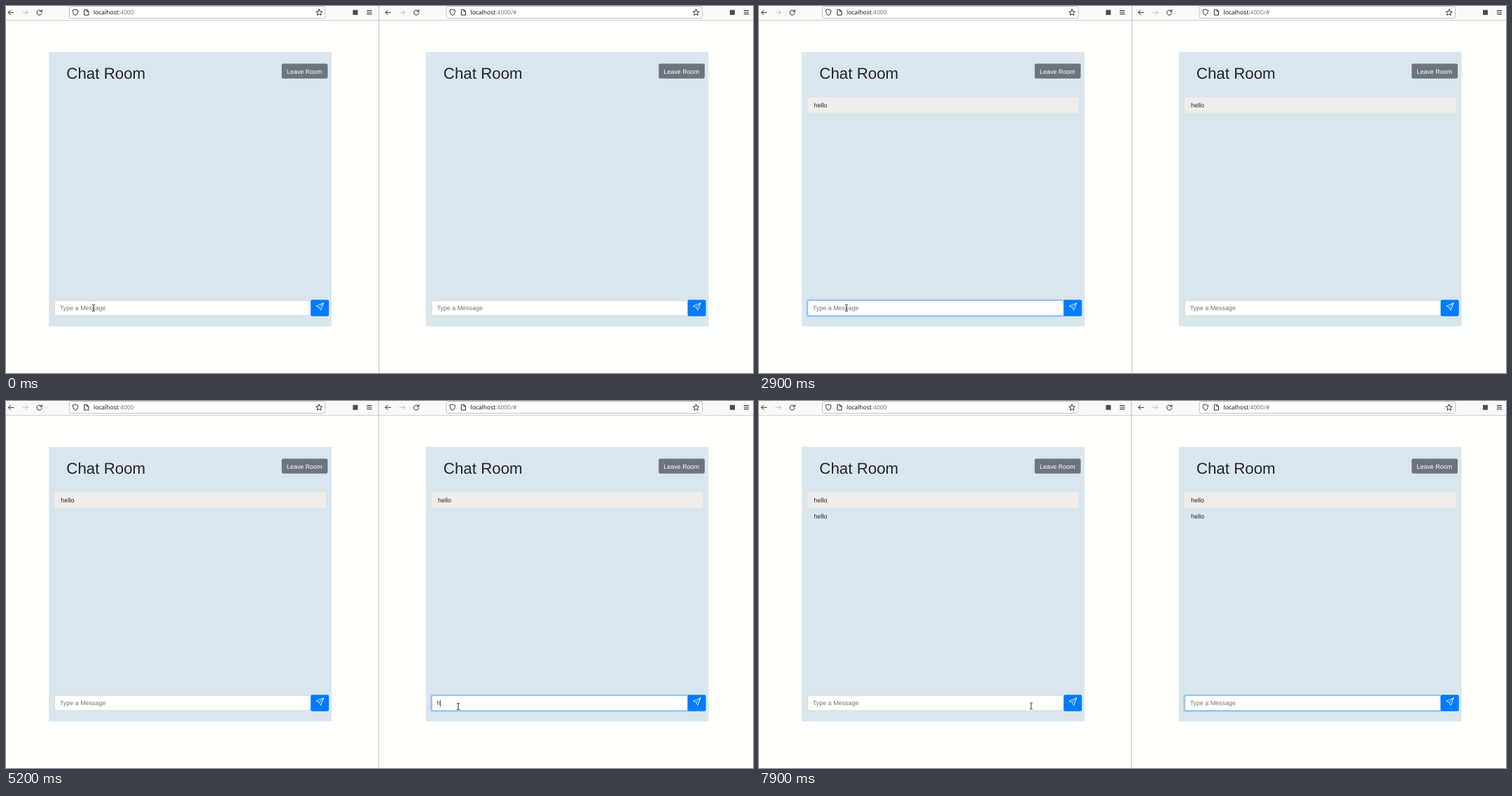
Recreate the animation shown at these times as an HTML page. Size 1067 by 525 pixels, loop 8 s.

```html
<!DOCTYPE html>
<html lang="en">
<head>
<meta charset="utf-8">
<title>Chat Room</title>
<style>
  html, body { margin: 0; width: 100%; height: 100%; overflow: hidden; background: #fffffc; }
  svg { display: block; }
  text { font: 8.93px "Liberation Sans", Arial, sans-serif; fill: #212529; text-rendering: geometricPrecision; }
  .title { font-size: 22.33px; }
  .url { font: 8.48px "Noto Sans", "Open Sans", sans-serif; fill: #15141a; }
  .port { fill: #77767b; }
  .hint { fill: #6c757d; }
  .typed { fill: #495057; }
  .light { fill: #fff; }
  .icon { fill: none; stroke: #2b2a33; stroke-width: 1; stroke-linecap: round; stroke-linejoin: round; }
  .off { stroke: #bdbdc0; }
</style>
</head>
<body>
<svg width="1067" height="525" viewBox="0 0 1067 525">
  <defs>
    <g id="toolbar">
      <rect x="90.5" y=".5" width="365.5" height="17" rx="2.5" fill="#fffffd" stroke="#bcbcbe" stroke-width=".9"/>
      <g class="icon">
        <path d="M11 9.3H3.5M6.7 6L3.4 9.3L6.7 12.6"/>
        <path class="off" d="M23.7 9.3H31.2M28 6L31.3 9.3L28 12.6"/>
        <path d="M50.6 7.4A3.6 3.6 0 1 0 51.2 10M51.3 5.4V8H48.6"/>
        <path d="M99.2 5L102.9 6.3C103 9.8 101.7 12.2 99.2 13.4C96.700 12.2 95.400 9.8 95.500 6.300Z"/>
        <path d="M112.200 5.300H115.700L118 7.600V13H112.200ZM115.500 5.500V7.800H117.800"/>
        <path d="M447.200 4.800L448.500 7.700L451.600 8L449.300 10.100L450 13.200L447.200 11.600L444.400 13.200L445.100 10.100L442.800 8L445.900 7.700Z"/>
        <path d="M515.800 6.500H522.200M515.800 9H522.200M515.800 11.500H522.200"/>
      </g>
      <rect x="495.500" y="5.700" width="7" height="7" fill="#4a4a52"/>
    </g>
    <g id="room">
      <rect x="61.200" y="65.700" width="403.800" height="392.500" fill="#d9e6ed"/>
      <text class="title" x="86.300" y="104">Chat Room</text>
      <rect x="393.800" y="82.400" width="65.700" height="21.400" rx="2.200" fill="#6c757d"/>
      <text class="light" x="401" y="96.500">Leave Room</text>
    </g>
    <g id="send">
      <rect x="435.200" y="420.200" width="26" height="23.500" rx="2.200" fill="#007bff"/>
      <path d="M453.800 424.700L443.200 429.200L447.300 431.300L449.600 435.200ZM447.300 431.300L453.800 424.700" fill="none" stroke="#fff" stroke-width=".85" stroke-linejoin="round"/>
    </g>
    <g id="beam" fill="none" stroke="#333" stroke-width="1">
      <path d="M0 -4V4M-2 -4.500H-.6L0 -4L.6 -4.500H2M-2 4.500H-.6L0 4L.6 4.500H2"/>
    </g>
    <path id="arrow" d="M0 0V9.500L2.200 7.500L3.600 10.800L5 10.200L3.600 7H6.600Z" fill="#222" stroke="#fff" stroke-width=".6"/>
    <path id="hand" d="M-.6 -4.500V1L-2 .2V1.500L-.8 5H2.600L3.300 .5L.8 -.2V-4.500Z" fill="#222" stroke="#fff" stroke-width=".5"/>
  </defs>

  <rect width="1067" height="525" fill="#fffffc"/>
  <rect width="1067" height="20" fill="#f9f9f8"/>
  <rect y="20" width="1067" height="1" fill="#d0d0d0"/>
  <g id="panes"></g>
  <rect id="divider" y="0" width="1" height="525" fill="#bdbdbd"/>
  <use id="cursor"/>
</svg>
<script>
const LOOP = 8000, TICK = 100, SHIFT = 538.5;

// Tracks hold [start time, ...value]; the latest started entry applies.
const panes = [
  {
    url: '',
    text: [[0, ''], [1400, 'h'], [1600, 'he'], [2100, 'hel'], [2200, 'hell'], [2400, 'hello'], [2900, '']],
    focus: [[0, 0], [600, .3], [700, .9], [800, 1], [4600, .4], [4700, 0]],
    caret: [[0, 0], [700, 1], [2900, 0], [3800, 1], [4300, 0]]
  },
  {
    url: '/#',
    text: [[0, ''], [5200, 'h'], [5300, 'he'], [5900, 'hel'], [6200, 'hello'], [6900, '']],
    focus: [[0, 0], [4600, .3], [4700, 1]],
    caret: [[0, 0], [4600, 1], [5700, 0], [5900, 1], [7000, 0]]
  }
];
const messages = [[0, 0], [2900, 1], [6900, 2]];
const pointer = [
  [0, 'beam', 125, 432],
  [3800, 'beam', 150, 434], [3900, 'beam', 240, 439], [4000, 'arrow', 350, 451],
  [4100, 'arrow', 470, 457], [4200, 'arrow', 560, 455], [4300, 'arrow', 624, 447],
  [4400, 'beam', 646, 437],
  [7500, 'beam', 650, 440], [7600, 'arrow', 560, 437], [7700, 'hand', 455, 435],
  [7900, 'beam', 388.7, 436.3]
];

const $ = id => document.getElementById(id);
const at = (track, t) => track.findLast(entry => entry[0] <= t);
const show = (el, on) => el.setAttribute('visibility', on ? 'visible' : 'hidden');

function set(el, attrs) {
  for (const key in attrs) el.setAttribute(key, attrs[key]);
}

function build(pane, i) {
  const g = document.createElementNS('http://www.w3.org/2000/svg', 'g');
  g.setAttribute('transform', `translate(${i * SHIFT})`);
  g.innerHTML = `
    <use href="#toolbar"/>
    <text class="url" x="125" y="12.2">localhost<tspan class="port">:4000${pane.url}</tspan></text>
    <use href="#room"/>
    <g class="message">
      <rect x="69.5" y="130.8" width="387.5" height="22.4" fill="#efeeeb"/>
      <text x="78.6" y="145.2">hello</text>
    </g>
    <g class="message"><text x="78.6" y="167.6">hello</text></g>
    <rect x="69.7" y="421.5" width="365.600" height="21.300" rx="2.200" fill="#fffffd" stroke="#ced4da" stroke-width=".7"/>
    <g class="ring" fill="none">
      <rect x="68.600" y="420.400" width="367.800" height="23.500" rx="3" stroke="#007bff" stroke-opacity=".27" stroke-width="1.800"/>
      <rect x="69.700" y="421.500" width="365.600" height="21.300" rx="2.200" stroke="#80bdff" stroke-width=".9"/>
    </g>
    <text class="hint" x="76.900" y="435.300">Type a Message</text>
    <text class="typed" x="76.900" y="435.300"></text>
    <rect class="caret" y="427.300" width=".8" height="10.400" fill="#495057"/>
    <use href="#send"/>`;
  $('panes').append(g);
  const find = name => g.querySelector('.' + name);
  pane.rows = g.querySelectorAll('.message');
  pane.el = { ring: find('ring'), hint: find('hint'), typed: find('typed'), caret: find('caret') };
}

function drawPane({ el, rows, text, focus, caret }, t) {
  const value = at(text, t)[1];
  const count = at(messages, t)[1];
  rows.forEach((row, i) => show(row, i < count));
  el.typed.textContent = value;
  show(el.hint, !value);
  el.ring.setAttribute('opacity', at(focus, t)[1]);
  const width = value ? el.typed.getComputedTextLength() : 0;
  el.caret.setAttribute('x', 76.7 + width);
  show(el.caret, at(caret, t)[1]);
}

function draw(now) {
  const t = Math.floor(now % LOOP / TICK) * TICK;
  panes.forEach(pane => drawPane(pane, t));
  const [, shape, x, y] = at(pointer, t);
  set($('cursor'), { href: '#' + shape, transform: `translate(${x} ${y})` });
  $('divider').setAttribute('x', t < 4600 ? 532.2 : 531.6);
}

panes.forEach(build);
const start = performance.now();
function frame() {
  draw(performance.now() - start);
  requestAnimationFrame(frame);
}
frame();
</script>
</body>
</html>
```
